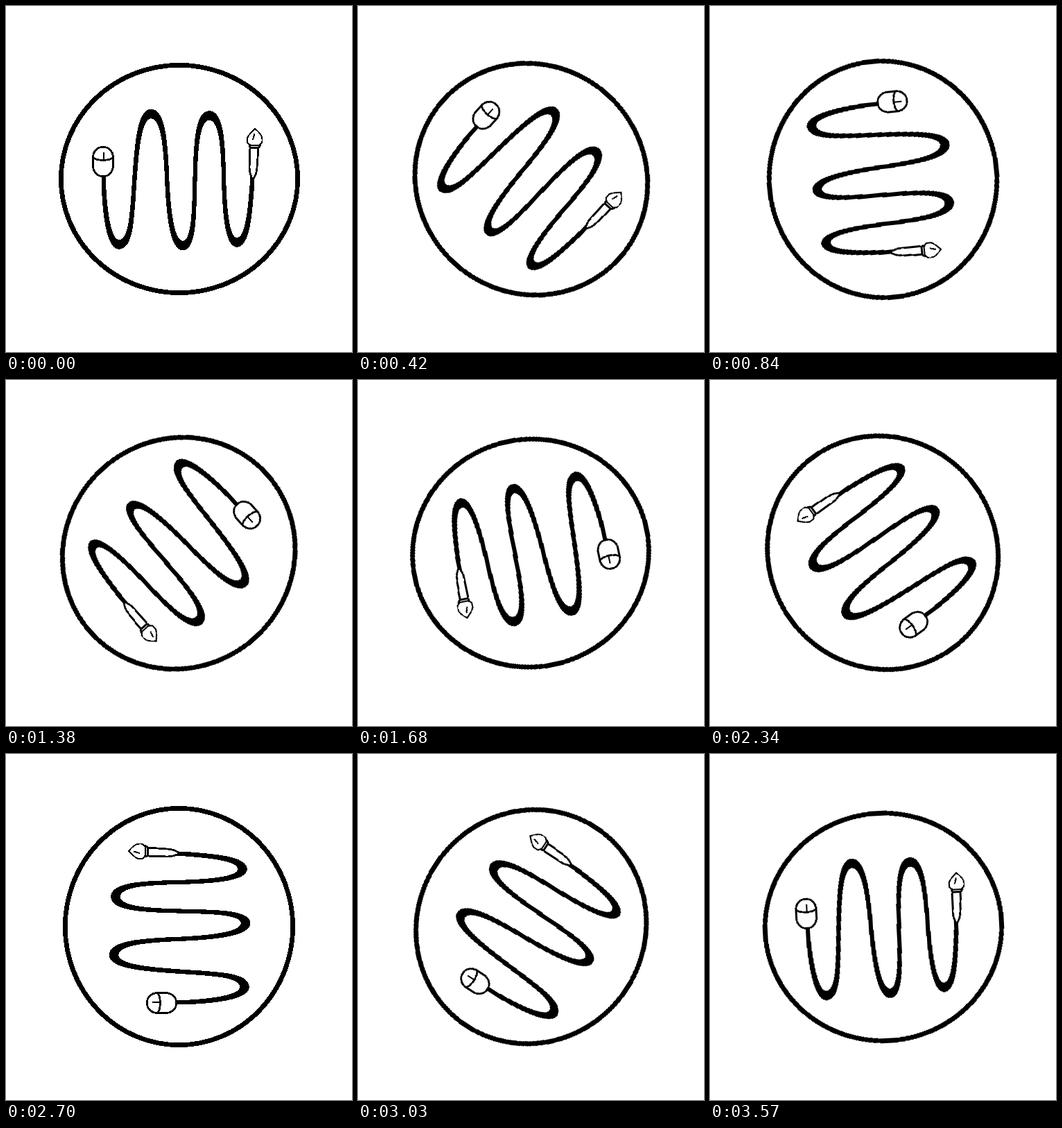
Write an HTML page that moves like this. It is 499 by 499 pixels and loops after 3.6 s.

```html
<!DOCTYPE html>
<html lang="en">
<head>
<meta charset="utf-8">
<title>Mouse and brush</title>
<style>
  html, body { margin: 0; width: 100%; height: 100%; overflow: hidden; background: #fff; }
  svg { display: block; width: 100vw; height: 100vh; }
  .badge {
    fill: none;
    stroke: #000;
    stroke-linejoin: round;
    shape-rendering: crispEdges;
    transform-origin: 249.5px 249.5px;
    animation: spin 3.6s steps(120) infinite;
  }
  .ring { stroke-width: 6.8; }
  .cable { stroke-width: 6; }
  .tool { fill: #fff; stroke-width: 2.8; }
  .line { fill: none; }
  .thin { stroke-width: 2; }
  @keyframes spin { to { transform: rotate(360deg); } }
</style>
</head>
<body>
<svg viewBox="0 0 499 499">
  <defs>
    <path id="wave" d="M140.5 247C141.5 282 145.5 344 163 344
      C181 344 182 300 185 255C188 210 191.5 155.5 209 155.5
      C226 155.5 230 195 232 245C234 295 239 345.5 255 345.5
      C271 345.5 271.5 300 272.5 250C273.5 200 276.5 158 293 158
      C310 158 313 196 314 245C315 295 319 341 333 341
      C349 341 352.5 293 355.5 250"/>
  </defs>
  <g class="badge">
    <ellipse class="ring" cx="250" cy="249.5" rx="170.7" ry="164.2"/>

    <!-- Vertical offsets thicken the bends like a broad pen -->
    <g class="cable">
      <use href="#wave" y="-3.8"/>
      <use href="#wave"/>
      <use href="#wave" y="3.8"/>
    </g>

    <g class="tool">
      <path d="M125.5 219C125.5 198 154.5 198 154.5 219V230C154.5 251 125.5 251 125.5 230Z"/>
      <path class="line" d="M125.5 217.5C129 224 151 224 154.5 217.5M141 211V222"/>
    </g>

    <g class="tool">
      <path d="M352 204L351 233Q351.5 242 355 249H357Q361.5 242 362 233L364 204Z"/>
      <path d="M351 200.5H366.5L364.5 204.5H352Z"/>
      <path class="thin" d="M359 177C355 181 347.5 187 347.5 193C347.5 198 350 200 353 200.5H365C369 199 370 196 369.5 192C369 186 363 180 359 177Z"/>
      <path class="line thin" d="M358.5 184L356 193"/>
    </g>
  </g>
</svg>
</body>
</html>
```
